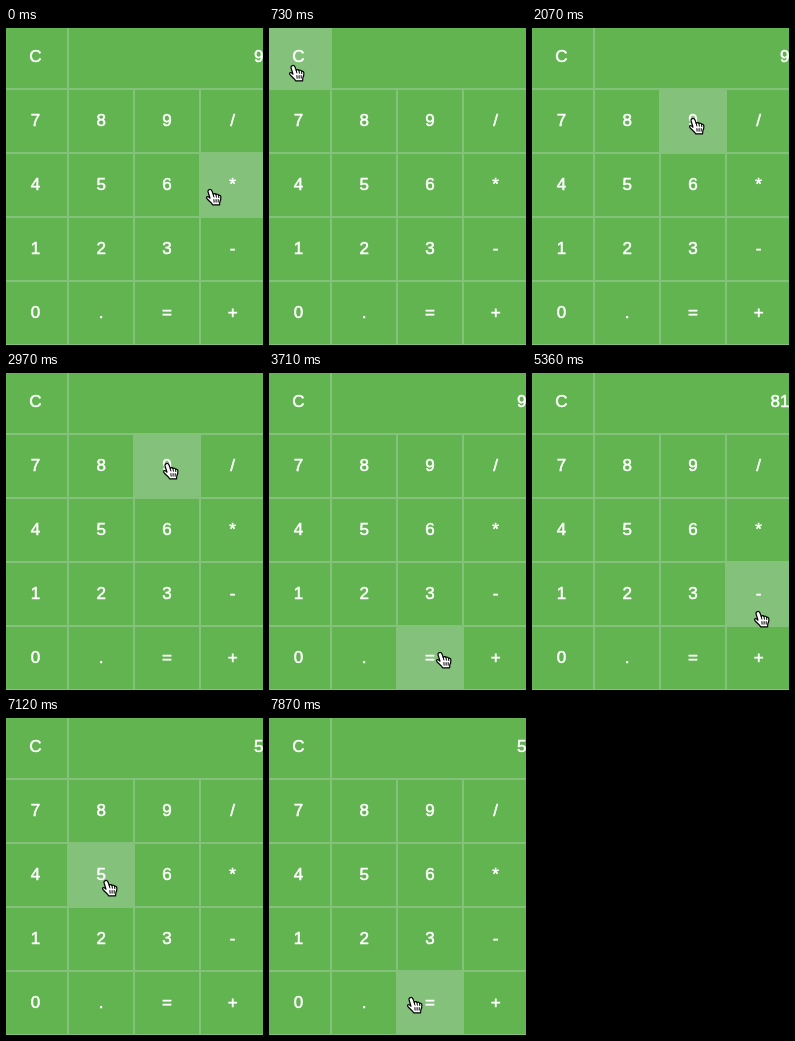
Animation of 257 by 317 pixels, one loop 8 s. Source, as an HTML page:

```html
<!DOCTYPE html>
<html lang="en">
<head>
<meta charset="utf-8">
<title>Calculator</title>
<style>
  html, body { margin: 0; width: 100%; height: 100%; overflow: hidden; background: #62b450; }
  svg { display: block; width: 257px; height: 317px; }
  text { font: 17px "Liberation Sans", Arial, sans-serif; fill: #fff; stroke: #fff; stroke-width: .55; }
</style>
</head>
<body>
<svg viewBox="0 0 257 317">
  <rect width="257" height="317" fill="#62b450"/>
  <rect id="hover" width="66" height="64" fill="#84c27b"/>
  <g id="lines" fill="#84c27b"></g>
  <g id="labels" text-anchor="middle"></g>
  <text id="display" x="257.4" y="34" text-anchor="end"></text>
  <g id="hand" stroke="#000" stroke-linecap="round" stroke-linejoin="round">
    <path fill="#fff" stroke-width="1.2" d="M-.6 .6C.8 .1 1.6 .8 2 2L3.2 5.4C3.8 4.4 5.6 4.4 6 5.6C6.8 4.8 8.4 5.2 8.6 6.4C9.6 5.8 10.8 6.6 10.9 8C11 10 10.6 11.4 9.8 13L9.6 15.8H2.6C2 14-1.2 12-3.2 9.4C-4 8-2.6 7-1.4 7.9L0 9.2L-1.9 3C-2.2 1.8-1.6 .9-.6 .6Z"/>
    <path fill="none" d="M3.2 5.6L3.9 8M6 5.8L6.4 8.2M8.6 6.6L8.8 8.6M3.9 10.6L4.1 13.2M6.1 10.6V13.2M8.2 10.6V13.2"/>
  </g>
</svg>
<script>
const LOOP = 8000, STEP = 148.4, COL = 66, ROW = 64, LEFT = -3, TOP = -2;
const KEYS = ['C', '789/', '456*', '123-', '0.=+'];
const byId = id => document.getElementById(id);

// The hand travels to each stop between two steps; a press there changes the display.
const STOPS = [
  { leave: 0, arrive: 5, x: 24, y: 37, press: 5, shows: '' },
  { leave: 6, arrive: 10, x: 161, y: 90, press: 14, shows: '9' },
  { leave: 14, arrive: 16, x: 204, y: 161, press: 18, shows: '' },
  { leave: 18, arrive: 20, x: 161, y: 90, press: 22, shows: '9' },
  { leave: 22, arrive: 25, x: 171, y: 279, press: 28, shows: '81' },
  { leave: 32, arrive: 36, x: 226, y: 238 },
  { leave: 36, arrive: 39, x: 226, y: 279, press: 41, shows: '' },
  { leave: 41, arrive: 43, x: 197, y: 257 },
  { leave: 43, arrive: 46, x: 100, y: 162, press: 48, shows: '5' },
  { leave: 49, arrive: 53, x: 142, y: 279 }
];

function add(parent, tag, attrs, text = '') {
  const node = document.createElementNS('http://www.w3.org/2000/svg', tag);
  for (const name in attrs) node.setAttribute(name, attrs[name]);
  node.textContent = text;
  byId(parent).append(node);
}

for (let row = 1; row <= 5; row++) {
  add('lines', 'rect', { x: 0, y: TOP - 2 + row * ROW, width: 257, height: 2 });
}
for (let col = 1; col <= 3; col++) {
  const y = col > 1 ? 60 : 0;
  add('lines', 'rect', { x: LEFT - 2 + col * COL, y, width: 2, height: 317 - y });
}
KEYS.forEach((keys, row) => [...keys].forEach((key, col) =>
  add('labels', 'text', { x: 29.5 + col * 65.7, y: 34 + row * ROW }, key)));

const ease = p => p * p * (3 - 2 * p);

function stateAt(step) {
  let x = 204, y = 161, display = '9';
  for (const stop of STOPS) {
    if (step <= stop.leave) break;
    const p = ease(Math.min(1, (step - stop.leave) / (stop.arrive - stop.leave)));
    x += (stop.x - x) * p;
    y += (stop.y - y) * p;
    if (step >= stop.press) display = stop.shows;
  }
  return { x: Math.round(x), y: Math.round(y), display };
}

function render(t) {
  const { x, y, display } = stateAt(Math.floor((t + 15) / STEP));
  byId('hover').setAttribute('x', Math.floor((x - LEFT) / COL) * COL + LEFT);
  byId('hover').setAttribute('y', Math.floor((y - TOP) / ROW) * ROW + TOP);
  byId('hand').setAttribute('transform', `translate(${x} ${y})`);
  byId('display').textContent = display;
}

const start = performance.now();
function tick() {
  render((performance.now() - start) % LOOP);
  requestAnimationFrame(tick);
}
tick();
</script>
</body>
</html>
```
